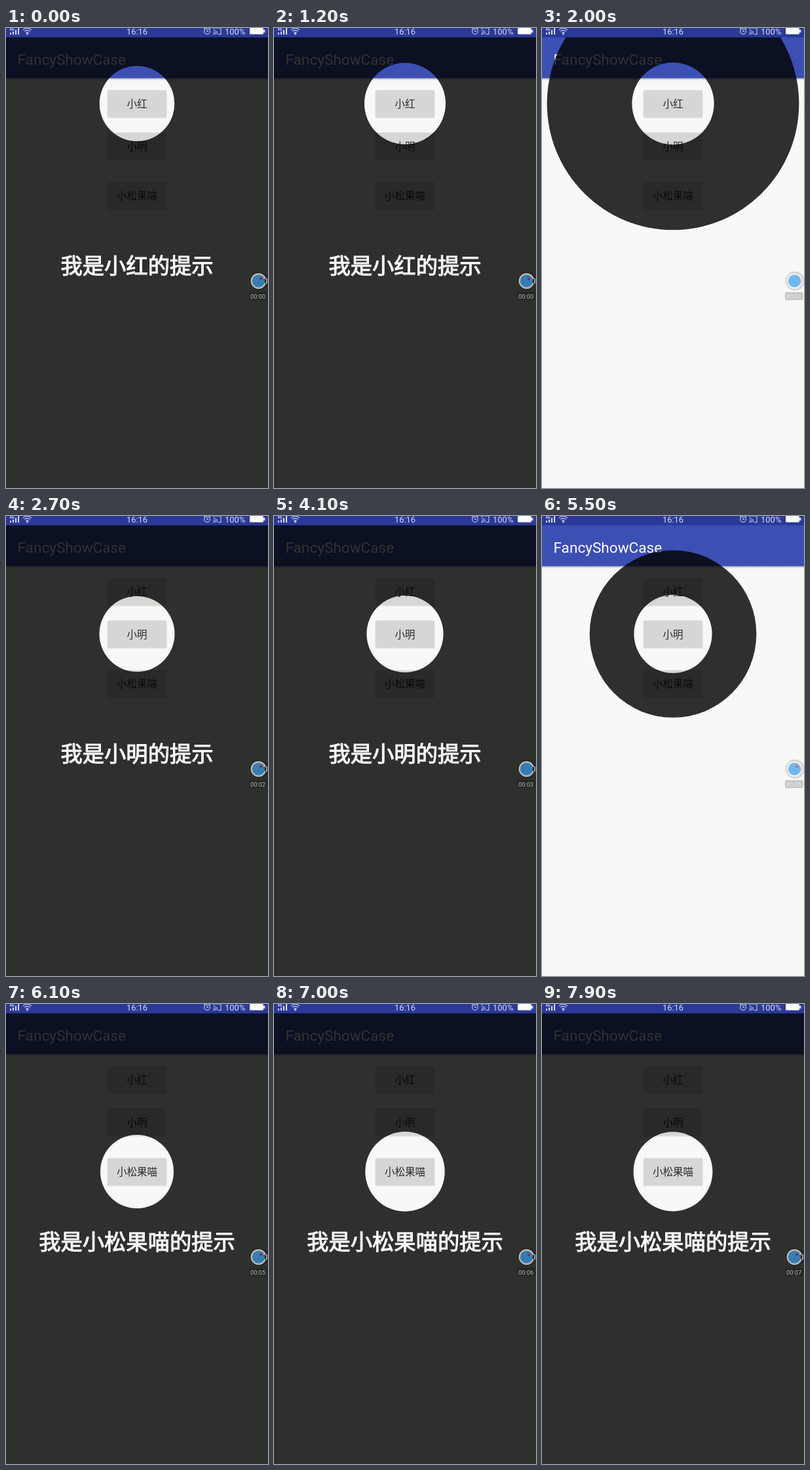
An HTML page for the animation above (8000 ms loop, 400 by 700 pixels).

```html
<!DOCTYPE html>
<html lang="zh">
<head>
<meta charset="utf-8">
<style>
html, body { margin: 0; width: 100%; height: 100%; overflow: hidden; background: #f7f9f6; }
svg { display: block; width: 400px; height: 700px; }
text { font-family: "Noto Sans CJK SC", "Noto Sans CJK", sans-serif; }
.latin { font-family: Roboto, sans-serif; }
.label { font-size: 15.5px; font-weight: 300; fill: #2c2d2c; text-anchor: middle; }
</style>
</head>
<body>
<svg viewBox="0 0 400 700">
  <defs>
    <clipPath id="reveal"><circle id="edge" cx="200" r="0"/></clipPath>
    <linearGradient id="shade" x2="0" y2="1">
      <stop offset="0" stop-color="#000" stop-opacity=".24"/>
      <stop offset="1" stop-color="#000" stop-opacity="0"/>
    </linearGradient>
  </defs>
  <rect width="400" height="700" fill="#f7f9f6"/>
  <rect y="76.500" width="400" height="3.500" fill="url(#shade)"/>
  <rect y="14" width="400" height="62.500" fill="#3c4fb3"/>
  <text class="latin" x="17.5" y="55.5" font-size="22.6" fill="#fff">FancyShowCase</text>
  <g id="buttons"></g>

  <g clip-path="url(#reveal)">
    <path id="veil" fill="#000200" fill-opacity=".81" fill-rule="evenodd"/>
    <text id="tip" x="200" y="373.7" font-size="33.3" text-anchor="middle" fill="#f7f9f6" stroke="#f7f9f6" stroke-width="1.1"></text>
  </g>

  <g id="status">
    <rect width="400" height="14.2" fill="#2b3a98"/>
    <g fill="#d9ddf0">
      <text class="latin" x="5.5" y="4" font-size="5.5" font-weight="700">4G</text>
      <path d="M6 7h2v3h-2zM10 5.500h2v4.500h-2zM14 3h2v7h-2zM18 0h2v10h-2z"/>
      <text class="latin" x="200" y="10.300" font-size="12.800" text-anchor="middle">16:16</text>
      <text class="latin" x="334" y="9.600" font-size="13">100%</text>
      <rect x="372" y="0" width="21" height="9.500" rx="1.500" fill="#fff"/>
      <rect x="393" y="2.500" width="2.500" height="4.500" rx="1"/>
      <circle cx="32.500" cy="9" r="1.400"/>
      <circle cx="317.500" cy="9" r="1"/>
    </g>
    <g fill="none" stroke="#c5cbe6" stroke-width="1.100">
      <path d="M26 3q6.500-5.500 13 0M28.200 5.200q4.300-3.600 8.600 0M30.200 7.400q2.300-2 4.600 0"/>
      <circle cx="307" cy="5" r="4.300"/>
      <path d="M307 2.500v3h2.200M302 1.500l2-2M312 1.500l-2-2M317 2v-2h11v9.500h-4M317 3.700q5.500 0 5.500 5.800M317 6.300q3 0 3 3.200"/>
    </g>
  </g>

  <g id="recorder">
    <circle cx="386" cy="385" r="14.5" fill="#000" fill-opacity=".14"/>
    <rect x="371" y="402" width="27.500" height="12" rx="2" fill="#000" fill-opacity=".2"/>
    <g opacity=".66">
      <path d="M385.500 373a12 12 0 1 0 .01 0zM394 382.500l5-1.500v8l-5-1.500z" fill="#fff"/>
      <circle cx="385.500" cy="385" r="9.600" fill="#3daaff"/>
      <circle id="dot" cx="389" cy="381.500" r="2.100" fill="#f5222d"/>
      <text id="timer" class="latin" x="384.700" y="411.500" font-size="9.300" text-anchor="middle" fill="#fff"></text>
    </g>
  </g>
</svg>
<script>
const LOOP = 8000, STEP = 100, FADE = 345, FULL = 806;
const $ = id => document.getElementById(id);

// y: button centre; enter/leave: reveal and hide starts; beat/zero: pulse period and its low point
const cases = [
  { name: "小红", y: 115, enter: -1000, leave: 1869, beat: 769, zero: 92 },
  { name: "小明", y: 179.5, enter: 2224, leave: 5341.5, beat: 676, zero: 2609 },
  { name: "小松果喵", y: 255, enter: 5695, leave: 9000, beat: 684, zero: 6075 }
];

$("buttons").innerHTML = cases.map(({ name, y }) => `
  <rect x="154.500" y="${y - 20}" width="91" height="42.300" rx="2.500" fill="#000" fill-opacity=".1"/>
  <rect x="155" y="${y - 20.5}" width="90" height="41.200" rx="2" fill="#d5d7d4"/>
  <text class="label" x="200" y="${y + 6}">${name}</text>`).join("");

const clamp = v => Math.max(0, Math.min(1, v));

// Triangle wave between the smallest and the largest spotlight
function pulse(c, t) {
  const p = (((t - c.zero) / c.beat) % 1 + 1) % 1;
  return 55.5 + 7.4 * (1 - Math.abs(2 * p - 1));
}

function revealRadius(c, t) {
  return t < c.leave
    ? FULL * clamp((t - c.enter) / FADE) ** 3
    : FULL * (1 - clamp((t - c.leave) / FADE)) ** 3;
}

function draw(t) {
  const c = cases.find(c => t < c.leave + FADE);
  const r = pulse(c, t);
  $("edge").setAttribute("cy", c.y);
  $("edge").setAttribute("r", revealRadius(c, t));
  $("veil").setAttribute("d", `M0 14H400V700H0ZM${200 - r} ${c.y}a${r} ${r} 0 1 0 ${2 * r} 0a${r} ${r} 0 1 0 ${-2 * r} 0Z`);
  $("tip").textContent = `我是${c.name}的提示`;
  $("timer").textContent = "00:0" + Math.max(0, Math.floor((t - 300) / 1000));
  $("dot").setAttribute("visibility", t % 1100 < 660 ? "visible" : "hidden");
}

const start = performance.now();
function tick(now) {
  const t = Math.max(0, now - start) % LOOP;
  draw(Math.floor(t / STEP) * STEP);
  requestAnimationFrame(tick);
}
draw(0);
requestAnimationFrame(tick);
</script>
</body>
</html>
```
